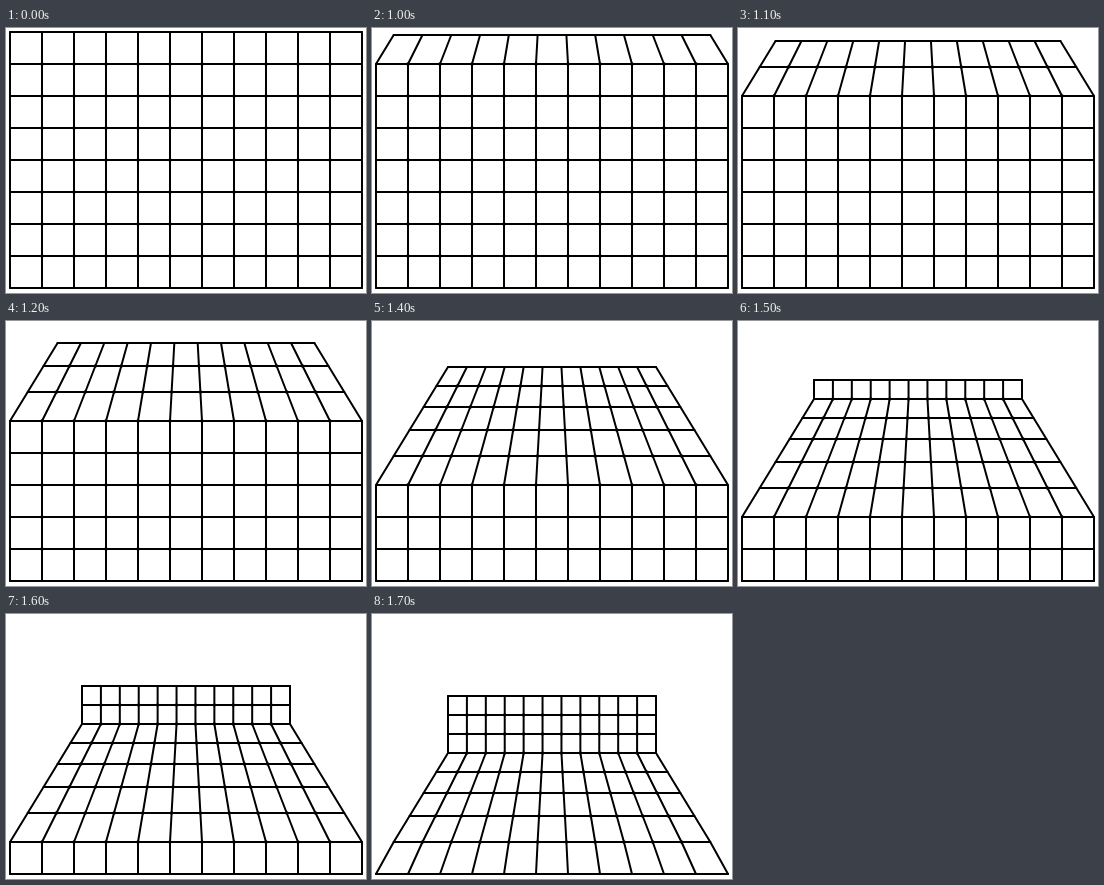
Recreate the animation shown at these times as an HTML page with a canvas. Size 360x265 px, loop 2700 ms.

```html
<!DOCTYPE html>
<html lang="en">
<head>
<meta charset="utf-8">
<title>Folding grid</title>
<style>
  html, body { margin: 0; width: 100%; height: 100%; overflow: hidden; background: #fff; }
  canvas { display: block; }
</style>
</head>
<body>
<canvas id="stage" width="360" height="265"></canvas>
<script>
const ctx = document.getElementById('stage').getContext('2d');
const COLS = 11, ROWS = 8, CELL = 32, EDGE = 4, MID = 180;
const DEPTH = [0, 29, 55, 78, 99, 118]; // height of each floor line above the fold
const FLOOR = DEPTH.length - 1;
const WALL_CELL = 19;
const INSET = 72 / 176 / DEPTH[FLOOR]; // narrowing per pixel of floor height
const LOOP = 2700, HOLD = 1000, STEP = 100;

// Position of a grid point once the top `folded` rows have tipped back.
function point(col, row, folded) {
  const past = folded - row;
  const x = EDGE + CELL * col;
  if (past <= 0) return [x, EDGE + CELL * row];
  const depth = DEPTH[Math.min(past, FLOOR)];
  const fold = EDGE + CELL * folded - (folded === ROWS ? 3 : 0);
  const wall = Math.max(0, past - FLOOR) * WALL_CELL;
  return [MID + (x - MID) * (1 - depth * INSET), fold - depth - wall];
}

function polyline(count, at) {
  ctx.beginPath();
  for (let i = 0; i <= count; i++) ctx.lineTo(...at(i));
  ctx.stroke();
}

function draw(folded) {
  ctx.fillStyle = '#fff';
  ctx.fillRect(0, 0, 360, 265);
  ctx.fillStyle = ctx.strokeStyle = '#000';
  ctx.lineWidth = 2;
  ctx.lineCap = ctx.lineJoin = 'round';
  for (let r = 0; r <= ROWS; r++) polyline(COLS, c => point(c, r, folded));
  for (let c = 0; c <= COLS; c++) polyline(ROWS, r => point(c, r, folded));

  // slightly heavier crossings
  for (let r = 1; r < ROWS; r++) {
    for (let c = 1; c < COLS; c++) {
      ctx.beginPath();
      ctx.arc(...point(c, r, folded), 1.7, 0, 2 * Math.PI);
      ctx.fill();
    }
  }
}

const start = performance.now();
function tick() {
  const t = (performance.now() - start) % LOOP;
  draw(t < HOLD ? 0 : Math.min(ROWS, 1 + Math.floor((t - HOLD) / STEP)));
  requestAnimationFrame(tick);
}
tick();
</script>
</body>
</html>
```
